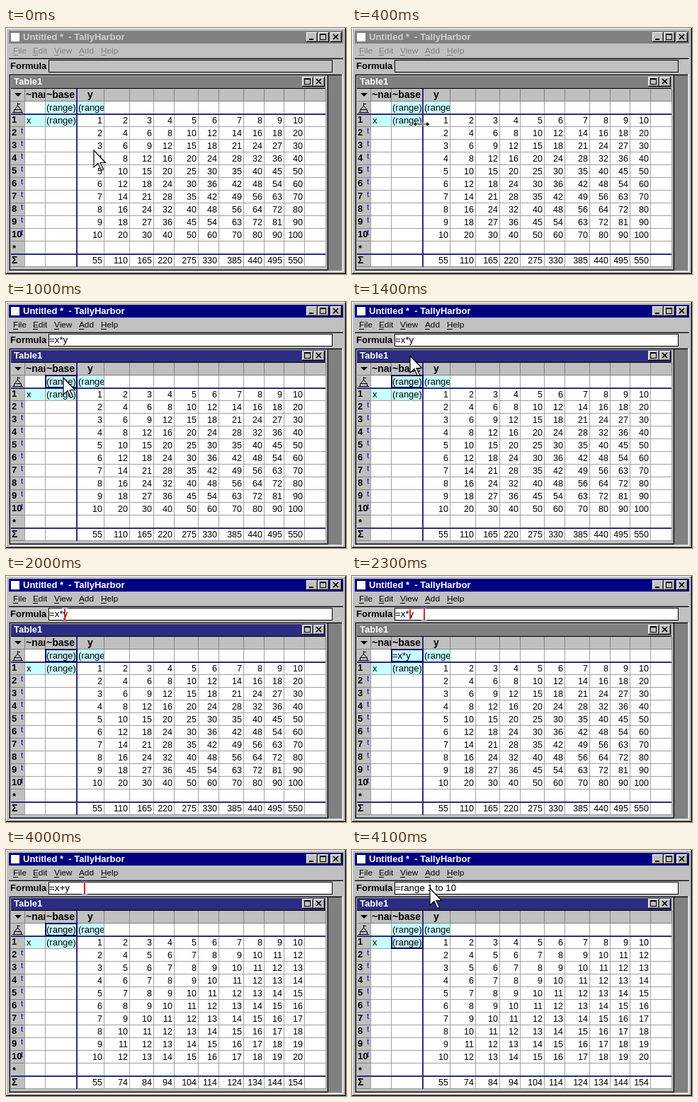
An HTML page that plays this animation: 480 by 348 pixels, repeating every 5.6 s.

```html
<!DOCTYPE html>
<html lang="en">
<head>
<meta charset="utf-8">
<title>Multiplication table</title>
<style>
html, body { margin: 0; width: 100%; height: 100%; overflow: hidden; background: #c0c0c0; }
svg { display: block; width: 480px; height: 348px; }
text { font-family: "Liberation Sans", Arial, sans-serif; font-size: 13px; white-space: pre; }
.b { font-weight: bold; }
.h { font-weight: bold; font-size: 14px; }
.n { font-size: 12.5px; text-anchor: end; }
.f { font-size: 13.3px; }
.m { font-size: 11.8px; }
rect { shape-rendering: crispEdges; }
</style>
</head>
<body>
<svg id="stage" viewBox="0 0 480 348" xmlns="http://www.w3.org/2000/svg">
  <defs>
    <clipPath id="nameClip"><rect x="26" y="86" width="29" height="18"/></clipPath>
    <clipPath id="yClip"><rect x="102" y="104" width="36" height="18"/></clipPath>
  </defs>
  <g id="scene"></g>
</svg>
<script>
const LOOP = 5600, STEP = 100;
const FACE = '#c0c0c0', SHADE = '#808080', LINE = '#a0a0a0', NAVY = '#2c2c80', CYAN = '#c8ffff';
const cols = [26, 55, 100, 138, 174, 208, 237, 271, 300, 335, 364, 392, 421, 451];
const rowY = r => 121 + 18 * (r - 1);

// step, x, y
const path = [
  [0, 124, 173], [4, 98, 136], [6, 84, 119], [9, 81, 112], [10, 81, 107],
  [12, 82, 86], [14, 82, 76], [16, 82, 57], [18, 82, 55], [21, 82, 55], [24, 110, 54]
];

const box = (x, y, w, h, fill) => `<rect x="${x}" y="${y}" width="${w}" height="${h}" fill="${fill}"/>`;
const frame = (x, y, w, h, t, color) =>
  box(x, y, w, t, color) + box(x, y + h - t, w, t, color) +
  box(x, y, t, h, color) + box(x + w - t, y, t, h, color);
const label = (x, y, s, cls = '', fill = '#000', extra = '') =>
  `<text x="${x}" y="${y}" class="${cls}" fill="${fill}" ${extra}>${s}</text>`;
const shape = (d, fill = 'none', stroke = '#000', w = 1) =>
  `<path d="${d}" fill="${fill}" stroke="${stroke}" stroke-width="${w}"/>`;

function raised(x, y, w, h) {
  return box(x, y, w, h, '#000') + box(x, y, w - 1, h - 1, '#fff') +
    box(x + 1, y + 1, w - 2, h - 2, SHADE) + box(x + 1, y + 1, w - 3, h - 3, FACE);
}

function sunken(x, y, w, h, fill) {
  return box(x, y, w, h, '#fff') + box(x, y, w - 1, h - 1, SHADE) +
    box(x + 1, y + 1, w - 2, h - 2, FACE) + box(x + 1, y + 1, w - 3, h - 3, '#000') +
    box(x + 2, y + 2, w - 4, h - 4, fill);
}

function button(x, y, kind) {
  const icons = {
    min: box(x + 4, y + 9, 6, 2, '#000'),
    max: frame(x + 3, y + 2, 9, 9, 1, '#000') + box(x + 3, y + 2, 9, 2, '#000'),
    close: shape(`M${x + 4} ${y + 3}l7 7m0 -7l-7 7`, 'none', '#000', 1.7)
  };
  return raised(x, y, 16, 14) + icons[kind];
}

function mainWindow(s) {
  const ink = s.active ? '#000' : SHADE;
  let g = raised(0, 0, 480, 348) +
    box(4, 4, 472, 18, s.active ? '#000080' : SHADE) + box(7, 7, 12, 12, '#fff') +
    label(24, 17, 'Untitled *  - TallyHarbor', 'b', s.active ? '#fff' : '#d0d0d0') +
    button(424, 6, 'min') + button(440, 6, 'max') + button(458, 6, 'close');
  [['File', 10], ['Edit', 38], ['View', 68], ['Add', 103], ['Help', 134]].forEach(([name, x]) => {
    g += label(x, 36, name, 'm', ink) + box(x, 38, name === 'Help' ? 8 : 7, 1, ink);
  });
  return g + box(4, 42, 472, 1, SHADE) + box(4, 43, 472, 1, '#000') +
    label(6, 58, 'Formula', 'b') +
    box(60, 45, 401, 18, '#000') + box(61, 46, 399, 16, s.formula ? '#fff' : FACE) +
    label(61, 58, s.formula, 'f') +
    sunken(4, 65, 472, 280, SHADE);
}

function cells(s) {
  let g = '';
  for (let r = 1; r <= 10; r++) {
    const y = rowY(r) + 14;
    g += label(8, y - 1, r, 'b');
    if (r > 1) g += label(21, y - 4, 't', 'm', '#0000e0');
    for (let c = 1; c <= 10; c++) {
      const sum = s.added && r > 1 && c > 1;
      g += label(cols[c + 2] - 2, y, sum ? r + c : r * c, 'n');
    }
  }
  for (let c = 1; c <= 10; c++)
    g += label(cols[c + 2] - 2, 333, s.added && c > 1 ? 54 + 10 * c : 55 * c, 'n');
  return g;
}

function tableWindow(s) {
  let g = box(6, 67, 449, 276, '#000') + box(6, 67, 448, 275, SHADE) + box(6, 67, 447, 274, FACE) +
    box(7, 68, 444, 17, s.tableActive ? NAVY : SHADE) +
    label(11, 80, 'Table1', 'b', '#fff') +
    button(418, 69, 'max') + button(434, 69, 'close') +
    box(7, 86, 444, 252, '#fff') + box(7, 86, 444, 18, FACE) + box(7, 104, 19, 234, FACE) +
    box(55, 104, 83, 18, CYAN) + box(26, 122, 74, 18, CYAN);
  if (s.select) g += box(55, s.select, 45, 18, s.edit ? CYAN : '#c8f0f0');

  for (const x of cols) g += box(x, 86, 1, 252, LINE) + box(x, 86, 1, 18, SHADE);
  for (let y = 103; y <= 337; y += 18)
    g += box(7, y, 444, 1, LINE) + box(7, y, 19, 1, SHADE);
  g += box(7, 85, 444, 1, '#000') + box(7, 103, 444, 1, SHADE) +
    box(7, 121, 444, 2, NAVY) + box(7, 319, 444, 2, NAVY) + box(99, 86, 2, 252, NAVY);

  g += shape('M12 92h10l-5 5z', '#000', 'none') +
    shape('M16.5 106v5M16 107.5h4M11.5 119v-3l5-6l5 6v3M9 119.5h15M12 115.5h9') +
    label(28, 99, '~name', 'h', '#000', 'clip-path="url(#nameClip)"') +
    label(57, 99, '~base', 'h') + label(115, 99, 'y', 'h') +
    label(57, 117, s.edit || '(range)') +
    label(102, 117, '(range)', '', '#000', 'clip-path="url(#yClip)"') +
    label(29, 135, 'x') + label(57, 135, '(range)') +
    label(9, 316, '*', 'b') + label(8, 333, 'Σ', 'h') + cells(s);
  if (s.select) g += frame(55, s.select - 1, 46, 19, 2, '#000060');
  return g;
}

function pointer(kind, x, y) {
  if (kind === 'beam')
    return shape(`M${x - 3} ${y - 9.5}h3l1 1l1 -1h3M${x - 3} ${y + 8.5}h3l1 -1l1 1h3`, 'none', '#8c9cff', 1.3) +
      box(x, y - 8, 2, 16, '#e02020');
  if (kind === 'resize')
    return shape(`M${x - 12} ${y}l5-4v3h14v-3l5 4l-5 4v-3h-14v3z`, '#000', '#fff');
  return shape(`M${x} ${y}v24l6-5.5 4.5 10 3-1.5-4.5-9.5h7.5z`, '#fff', '#000', 1.2);
}

function place(n) {
  const i = path.findIndex(p => p[0] > n);
  if (i < 0) return path[path.length - 1].slice(1);
  const [a, ax, ay] = path[i - 1], [b, bx, by] = path[i];
  const k = (n - a) / (b - a);
  return [Math.round(ax + (bx - ax) * k), Math.round(ay + (by - ay) * k)];
}

const typed = (n, cut, add) => n < cut ? '=x*y' : n < add ? '=xy' : '=x+y';

function stateAt(n) {
  const editing = n >= 21 && n < 40;
  return {
    active: n >= 8,
    tableActive: n >= 10 && !editing,
    select: n < 10 ? 0 : n < 41 ? 104 : 122,
    formula: n < 10 ? '' : n < 41 ? typed(n, 28, 34) : '=range 1 to 10',
    edit: editing ? typed(n, 30, 35) : '',
    caret: editing ? (n < 28 ? 81 : n < 34 ? 76 : 84) : 0,
    added: n >= 40,
    kind: n === 4 ? 'resize' : n >= 16 && n < 41 ? 'beam' : 'arrow'
  };
}

const scene = document.getElementById('scene');
let shown = -1;

function render(ms) {
  const n = Math.floor((ms % LOOP) / STEP);
  if (n === shown) return;
  shown = n;
  const s = stateAt(n);
  scene.innerHTML = mainWindow(s) + tableWindow(s) +
    (s.caret ? box(s.caret, 47, 2, 14, '#f02020') : '') +
    pointer(s.kind, ...place(n));
}

const start = performance.now();
function tick() {
  render(performance.now() - start);
  requestAnimationFrame(tick);
}
tick();
</script>
</body>
</html>
```
